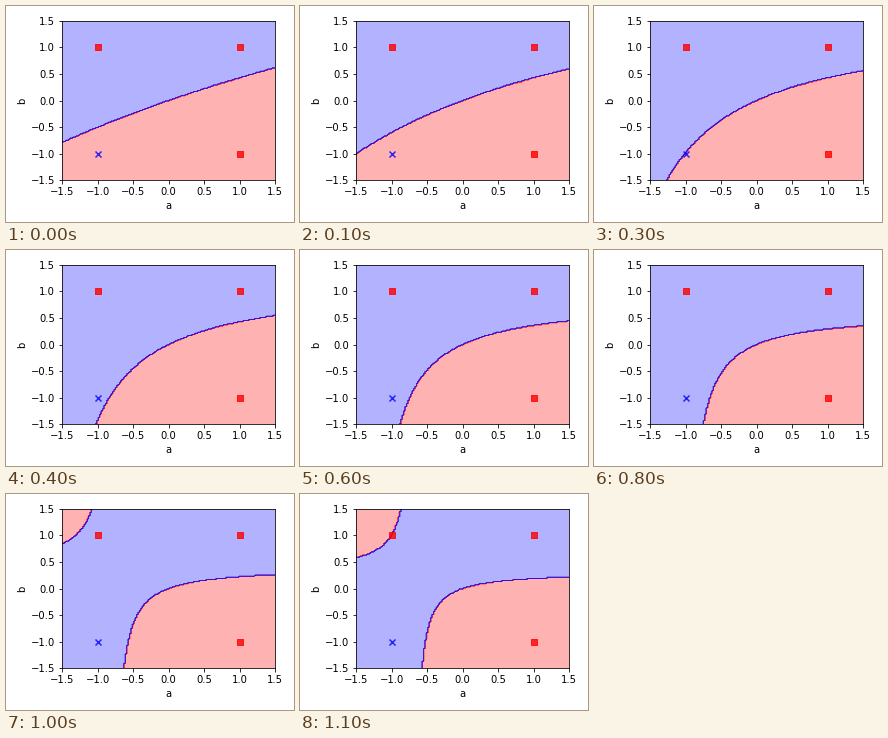
A matplotlib script for the animation above (1300 ms loop, 288 by 216 pixels).

```python
import numpy as np
import matplotlib.pyplot as plt
from matplotlib.animation import FuncAnimation
from matplotlib.colors import ListedColormap

W, H, DPI = 288, 216, 72
STEPS, HOLD = 12, 1
LIM = 1.5
RATE = 0.0805
START = np.array([-1.0, 2.1625, 0.1775])  # weights of a, b and a*b

# The first rule corrects both left corners, the second only the upper one.
BOTH = RATE * np.array([0, -2, 2])
UPPER = RATE * np.array([1, -1, 1])
FIRST = 4

grid = np.linspace(-LIM, LIM, 151)
A, B = np.meshgrid(grid, grid)

plt.rcParams.update({"font.family": "DejaVu Sans", "font.size": 10})
fig, ax = plt.subplots(figsize=(W / DPI, H / DPI), dpi=DPI)
cmap = ListedColormap(["red", "blue"])


def weights(step):
    return START + min(step, FIRST) * BOTH + max(step - FIRST, 0) * UPPER


def draw_regions(step):
    wa, wb, wab = weights(step)
    side = np.where(wa * A + wb * B + wab * A * B >= 0, 1, -1)
    return ax.contourf(A, B, side, alpha=0.3, cmap=cmap)


ax.scatter([-1, 1, 1], [1, 1, -1], c="red", marker="s", alpha=0.8, zorder=2)
ax.scatter([-1], [-1], c="blue", marker="x", alpha=0.8, zorder=2)
ticks = np.arange(-LIM, LIM + 0.1, 0.5)
ax.set(xlim=(-LIM, LIM), ylim=(-LIM, LIM), xticks=ticks, yticks=ticks,
       xlabel="a", ylabel="b")
fig.tight_layout()

regions = None


def update(i):
    global regions
    if regions is not None:
        regions.remove()
    regions = draw_regions(min(i, STEPS - 1))
    ax.set(xlim=(-LIM, LIM), ylim=(-LIM, LIM))
    return []


anim = FuncAnimation(fig, update, frames=STEPS + HOLD, interval=100,
                     repeat=True, repeat_delay=0, blit=False)
plt.show()
```
